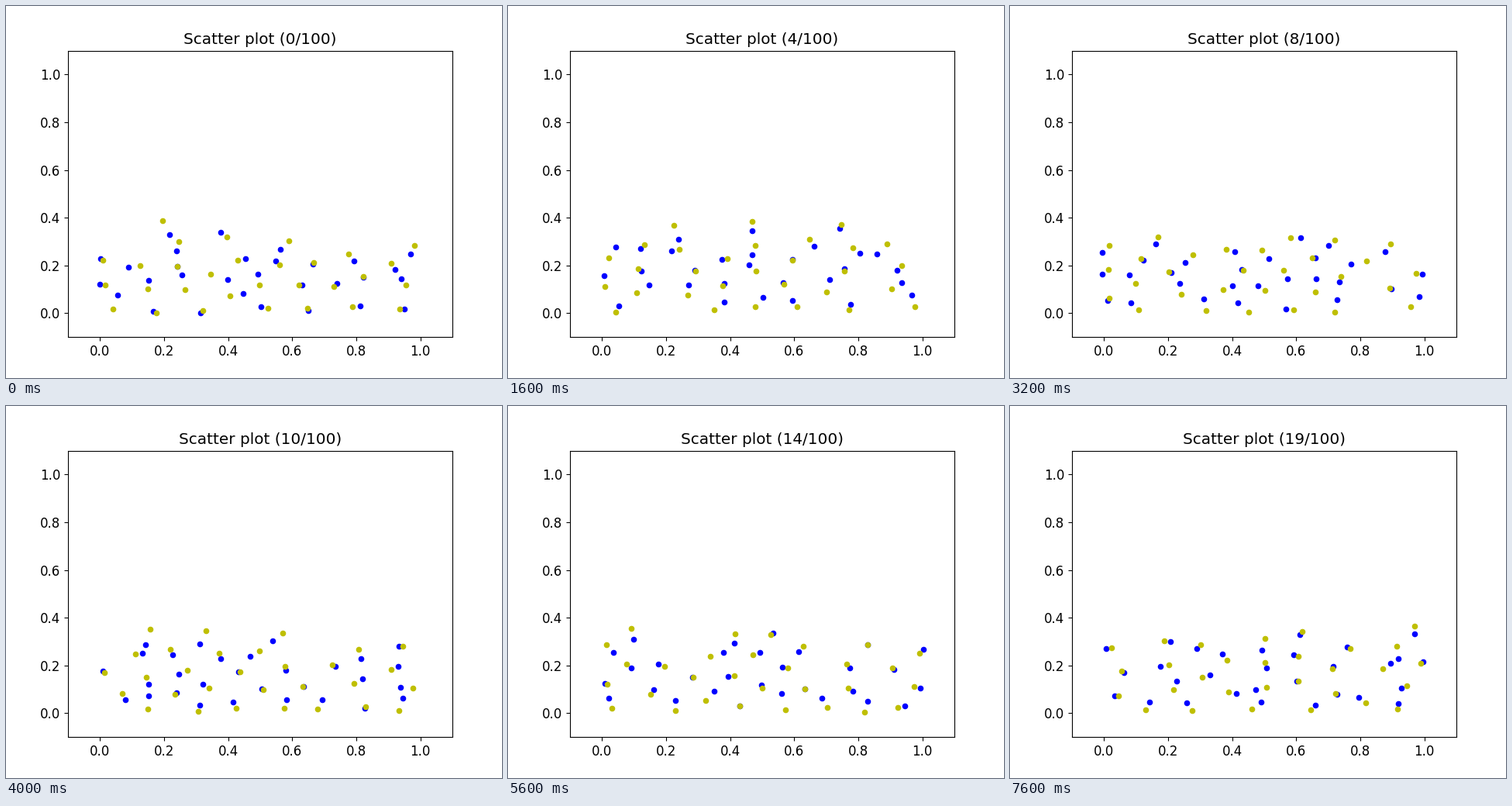
Animation, 640 px wide and 480 px high, one loop 8 s. Source, as a matplotlib script:

```python
import numpy as np
import matplotlib.pyplot as plt
from matplotlib.animation import FuncAnimation

FRAMES, INTERVAL, TOTAL = 20, 400, 100
COUNT, SPACING = 30, 0.103


def rest_height(x, heap, floor):
    """Height at which a disc dropped at x comes to rest on the heap."""
    height = floor
    for px, py in heap:
        gap = SPACING ** 2 - (x - px) ** 2
        if gap > 0:
            height = max(height, py + gap ** 0.5)
    return height


def make_heap(rng):
    """Drop discs one by one; each picks the lowest of a few random spots."""
    heap = []
    for _ in range(COUNT):
        floor = rng.uniform(0, 0.03)
        spots = rng.uniform(0, 1, rng.integers(3, 9))
        drops = [(x, rest_height(x, heap, floor)) for x in spots]
        heap.append(min(drops, key=lambda drop: drop[1]))
    return np.array(heap)


def predict(heap, rng):
    """Blue estimates: the heap pulled towards its mean height, with noise."""
    x = heap[:, 0] + rng.normal(0, 0.018, COUNT)
    y = 0.82 * heap[:, 1] + 0.03 + rng.normal(0, 0.02, COUNT)
    return np.column_stack([np.clip(x, -0.006, 1.009), np.maximum(y, 0)])


def layout(i):
    rng = np.random.default_rng(i)
    heap = make_heap(rng)
    guess = predict(heap, rng)
    # Now and then one estimate near the floor sinks below it.
    if rng.random() < 0.3:
        low = np.argmin(np.hypot(heap[:, 0] - 0.77, heap[:, 1]))
        guess[low, 1] = rng.uniform(-0.07, -0.03)
    return heap, guess


plt.rcParams.update({"font.family": "DejaVu Sans", "font.size": 12})
fig, ax = plt.subplots(figsize=(6.4, 4.8), dpi=100)
ticks = np.linspace(0, 1, 6)
ax.set(xlim=(-0.1, 1.1), ylim=(-0.1, 1.1), xticks=ticks, yticks=ticks)
blue = ax.scatter([], [], s=20, c="b")
yellow = ax.scatter([], [], s=20, c="y")
title = ax.set_title("")
layouts = [layout(i) for i in range(FRAMES)]


def update(i):
    heap, guess = layouts[i]
    yellow.set_offsets(heap)
    blue.set_offsets(guess)
    title.set_text(f"Scatter plot ({i}/{TOTAL})")
    return blue, yellow, title


anim = FuncAnimation(fig, update, frames=FRAMES, interval=INTERVAL,
                     repeat=True, repeat_delay=0, blit=False)
plt.show()
```
